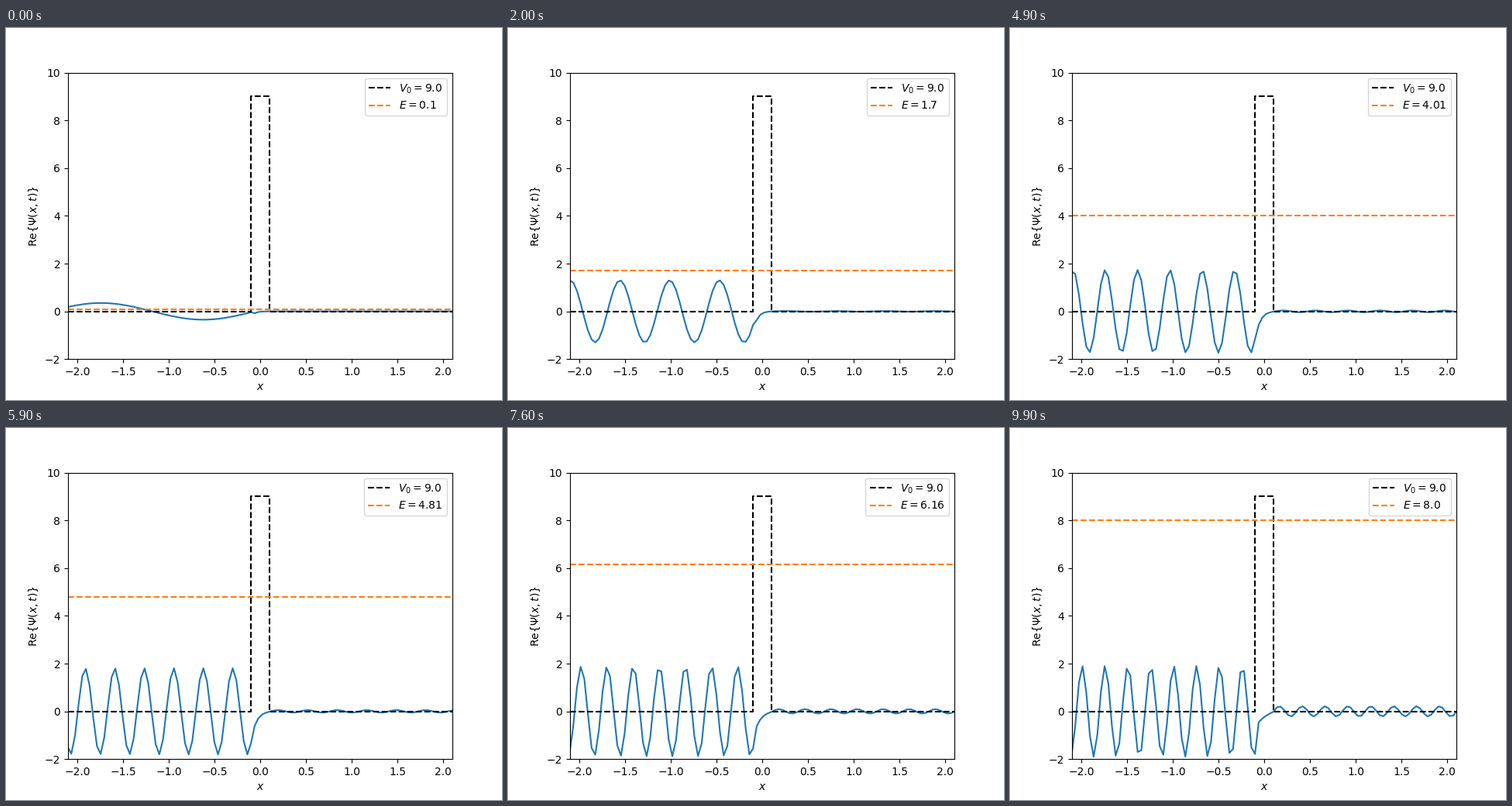
Animation, 640 px wide and 480 px high, one loop 10000 ms. Source, as a matplotlib script:

```python
import numpy as np
import matplotlib.pyplot as plt
from matplotlib.animation import FuncAnimation

# Stationary scattering states on a square barrier, in units with h = m = 1
HBAR = 1 / (2 * np.pi)
V0 = 9.0
A = 0.1        # half width of the barrier
X_MAX = 2.1
FRAMES = 100

x = np.linspace(-10, 10, 500)
energies = np.linspace(0.1, 8.0, FRAMES)


def wave(energy):
    """Real part of the wave for unit incoming amplitude."""
    k = np.sqrt(2 * energy) / HBAR
    q = np.sqrt(2 * (V0 - energy)) / HBAR
    ch, sh = np.cosh(2 * q * A), np.sinh(2 * q * A)
    edge = np.exp(-1j * k * A)

    # Value at the right wall, then the reflected amplitude
    out = edge / (ch + 0.5j * (q / k - k / q) * sh)
    refl = (out * (ch - 1j * k / q * sh) - edge) * edge

    left = np.exp(1j * k * x) + refl * np.exp(-1j * k * x)
    s = q * (A - np.clip(x, -A, A))
    inside = out * (np.cosh(s) - 1j * np.sinh(s))
    right = out * np.exp(1j * k * (x - A))
    return np.where(x < -A, left, np.where(x <= A, inside, right)).real


def energy_label(energy):
    return f"$E={round(energy, 2)}$"


fig, ax = plt.subplots(figsize=(6.4, 4.8), dpi=100)
psi_line, = ax.plot(x, wave(energies[0]), color="C0")
ax.plot([-X_MAX, -A, -A, A, A, X_MAX], [0, 0, V0, V0, 0, 0], "k--",
        label=f"$V_0={V0}$")
e_line = ax.axhline(energies[0], color="C1", linestyle="--",
                    label=energy_label(energies[0]))
ax.set_xlim(-X_MAX, X_MAX)
ax.set_ylim(-2, 10)
ax.set_xlabel("$x$")
ax.set_ylabel(r"Re$\{\Psi(x,t)\}$")
legend = ax.legend(loc="upper right")


def update(i):
    energy = energies[i]
    psi_line.set_ydata(wave(energy))
    e_line.set_ydata([energy, energy])
    legend.get_texts()[1].set_text(energy_label(energy))
    return psi_line, e_line, legend


anim = FuncAnimation(fig, update, frames=FRAMES, interval=100,
                     repeat=True, repeat_delay=0)
plt.show()
```
